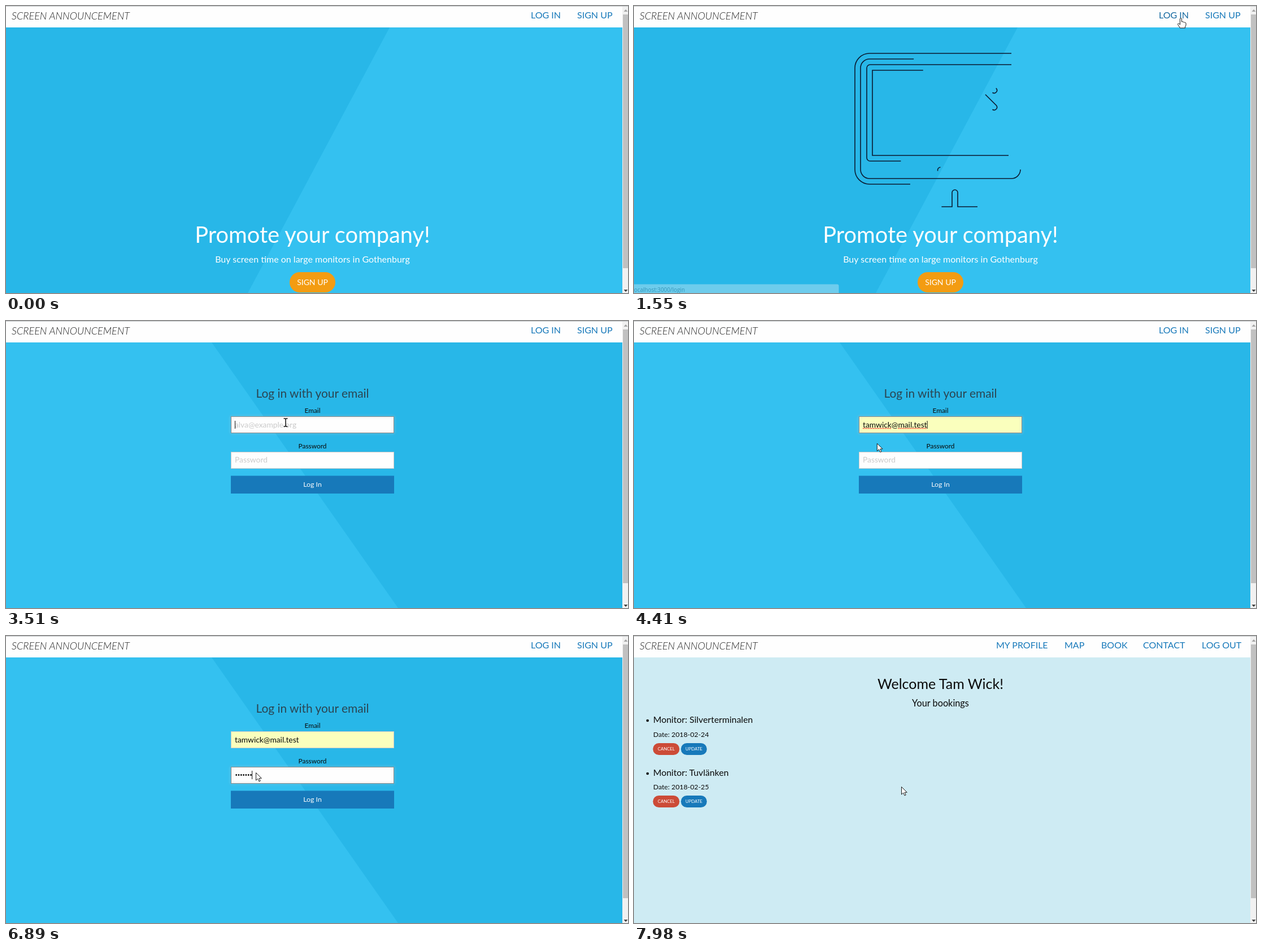
Animation of 1101 by 509 pixels, one loop 8 s. Source, as an HTML page:

```html
<!DOCTYPE html>
<html lang="en">
<head>
<meta charset="utf-8">
<title>Screen booking</title>
<style>
  html, body { margin: 0; width: 100%; height: 100%; overflow: hidden; background: #fefefe; }
  svg { display: block; width: 100%; height: 100%; }
  text { font-family: Lato, sans-serif; white-space: pre; }
  .mid { text-anchor: middle; }
  .nav { font-size: 16px; fill: #1779ba; }
  .dark { fill: #0a0a0a; }
  .white { fill: #fefefe; }
  .input { font-size: 13.8px; }
  .hint { fill: #cacaca; }
  .field { fill: #fefefe; stroke: #cacaca; }
  .glow { fill: none; stroke: #8a8a8a; filter: drop-shadow(0 0 2.5px #cacaca); }
  .caret { stroke: #111; }
  .squiggle { stroke: #e33; stroke-width: 1.4; stroke-dasharray: 2 1; }
  .pointer { fill: #fff; stroke: #1b1b1b; stroke-linejoin: round; }
  #monitor path { fill: none; stroke: #0b1a30; stroke-width: 1.6; }
</style>
</head>
<body>
<svg viewBox="0 0 1101 509">
  <defs>
    <g id="buttons">
      <rect x="33.5" y="190" width="47" height="21" rx="10.5" fill="#cc4b37"/>
      <rect x="83" y="190" width="46" height="21" rx="10.5" fill="#1779ba"/>
      <g class="mid white" font-size="7.8">
        <text x="57" y="202.5">CANCEL</text>
        <text x="106" y="202.5">UPDATE</text>
      </g>
    </g>
  </defs>

  <g id="home">
    <path fill="#28b7e8" d="M0 38H1091V509H0z"/>
    <path fill="#34c1f0" d="M679 38H1091V509H428z"/>
    <g id="monitor">
      <path d="M668 84H417a26 26 0 0 0-26 26V290a26 26 0 0 0 26 26H668a26 26 0 0 0 26-26V110a26 26 0 0 0-26-26z
               M684 290a16 16 0 0 1-16 16H417a16 16 0 0 1-16-16V110a16 16 0 0 1 16-16H668a16 16 0 0 1 16 16z"/>
      <path d="M668 104H418a6 6 0 0 0-6 6V269a6 6 0 0 0 6 6H668a6 6 0 0 0 6-6V110a6 6 0 0 0-6-6z
               M663 265H422V114H663z"/>
      <path d="M608 356H573V331a5 5 0 0 0-10 0V356H522V331a5 5 0 0 0-10 0V356H477a5 5 0 0 0 0 10H608a5 5 0 0 0 0-10z"/>
      <path d="M542.5 286a5 5 0 0 0 0 10a5 5 0 0 0 0-10z"/>
      <path d="M634.5 183.5a5 5 0 0 0 7-7l-40-40a5 5 0 0 0-7 7z"/>
      <path d="M634.5 153.5a5 5 0 0 0 7-7l-8-8a5 5 0 0 0-7 7z"/>
    </g>
    <rect x="502" y="472" width="81" height="36" rx="18" fill="#f39c12"/>
    <g class="mid white">
      <text x="542.5" y="420" font-size="39.8">Promote your company!</text>
      <text x="542.5" y="455" font-size="16">Buy screen time on large monitors in Gothenburg</text>
      <text x="542.5" y="495" font-size="14">SIGN UP</text>
    </g>
  </g>

  <g id="login">
    <path fill="#28b7e8" d="M0 38H1091V509H0z"/>
    <path fill="#34c1f0" d="M0 38H364L694 509H0z"/>
    <g class="mid dark">
      <text x="542.5" y="136" font-size="20.9" fill="#2b4552">Log in with your email</text>
      <text x="542.5" y="163" font-size="11.9">Email</text>
      <text x="542.5" y="226" font-size="11.9">Password</text>
    </g>
    <rect id="emailField" class="field" x="398.5" y="169.5" width="288" height="29"/>
    <rect class="field" x="398.5" y="232.5" width="288" height="29"/>
    <rect id="emailGlow" class="glow" x="398.5" y="169.5" width="288" height="29"/>
    <rect id="passGlow" class="glow" x="398.5" y="232.5" width="288" height="29"/>
    <text id="emailHint" class="input hint" x="405" y="189">alva@example.org</text>
    <text id="email" class="input dark" x="405" y="189">tamwick@mail.test</text>
    <g id="squiggles" class="squiggle">
      <line id="userLine" y1="190.5" y2="190.5"/>
      <line id="hostLine" y1="190.5" y2="190.5"/>
    </g>
    <text id="passHint" class="input hint" x="405" y="251">Password</text>
    <line id="dots" x1="407.7" y1="246.5" y2="246.5" stroke="#0a0a0a" stroke-width="2.9"
          stroke-linecap="round" stroke-dasharray="0 4.3"/>
    <path id="emailCaret" class="caret" d="M0 177v14"/>
    <path id="passCaret" class="caret" d="M0 239v15"/>
    <rect x="398" y="274.5" width="289" height="31.5" fill="#1779ba"/>
    <text class="mid white" x="542.5" y="294" font-size="12.3">Log In</text>
  </g>

  <g id="bookings">
    <path fill="#ceebf3" d="M0 38H1091V509H0z"/>
    <g class="dark">
      <text class="mid" x="542.5" y="94" font-size="25">Welcome Tam Wick!</text>
      <text class="mid" x="542.5" y="125" font-size="16.3">Your bookings</text>
      <circle cx="24" cy="150" r="2.3"/>
      <text x="34" y="154" font-size="15.8">Monitor: Silverterminalen</text>
      <text x="34" y="179" font-size="12.3">Date: 2018-02-24</text>
      <circle cx="24" cy="244" r="2.3"/>
      <text x="34" y="248" font-size="15.8">Monitor: Tuvlänken</text>
      <text x="34" y="272" font-size="12.3">Date: 2018-02-25</text>
    </g>
    <use href="#buttons"/>
    <use href="#buttons" y="93"/>
  </g>

  <path fill="#fefefe" d="M0 0H1091V37.5H0z"/>
  <path fill="#c4c6c8" d="M0 0H1101V1H0z"/>
  <text x="10" y="24" font-size="18" font-style="italic" font-weight="300" fill="#222">SCREEN ANNOUNCEMENT</text>
  <g id="guestNav" class="nav">
    <text id="loginLink" x="929" y="22">LOG IN</text>
    <text x="1011" y="22">SIGN UP</text>
  </g>
  <g id="userNav" class="nav">
    <text x="641" y="22">MY PROFILE</text>
    <text x="762" y="22">MAP</text>
    <text x="827" y="22">BOOK</text>
    <text x="901" y="22">CONTACT</text>
    <text x="1005" y="22">LOG OUT</text>
  </g>

  <path fill="#f1f1f1" d="M1091 1H1101V509H1091z"/>
  <path fill="#c1c1c1" d="M1092 15H1101V465H1092z"/>
  <path fill="#a3a3a3" d="M1093.5 10l3.5-4 3.5 4z"/>
  <path fill="#404040" d="M1093.5 503l3.5 4 3.5-4z"/>

  <g id="status">
    <path fill="#f2f4f5" d="M0 493.5H359.500q3 0 3 3V509H0z"/>
    <text x="0" y="507" fill="#4a5a62" style="font:9.9px 'Open Sans',sans-serif">ocalhost:3000/login</text>
  </g>

  <g id="cursor">
    <path id="arrow" class="pointer" d="M.5.5V14L3.700 11 6 16 8.200 15 6 10.300H10.300z"/>
    <path id="hand" class="pointer" d="M-1.500 1.500q1.500-2 3 0V7q2-1 2.700.6 2-.7 2.500.8 2-.5 2.300 1.300V13l-1.500 3v2H-1.500L-5.500 11.500q0-2 2-1.300L-1.500 12z"/>
    <path id="beam" d="M-3.500-7h2.500l1 1 1-1h2.500M0-6V6M-3.500 7h2.500l1-1 1 1h2.500" fill="none" stroke="#111" stroke-width="1.5"/>
  </g>
</svg>
<script>
const LOOP = 8000, DOT = 4.3;
const LOGIN_AT = 2630, BOOKINGS_AT = 7440;
const EMAIL_FOCUS = 3510, PREVIEW_AT = 3960, FILL_AT = 4410, PASS_FOCUS = 4800;
const keyTimes = [5660, 5660, 6050, 6130, 6360, 6530, 6660];

// Pointer track: time, x, y
const track = [
  [80, 320, 2], [860, 810, 42], [1470, 968, 21], [1740, 968, 21],
  [2630, 651, 95], [3160, 495, 180], [3580, 495, 180], [4110, 427, 211],
  [4360, 427, 211], [4650, 443, 243], [6889, 443, 243], [6890, 442, 242],
  [7599, 442, 242], [7600, 449, 248], [7979, 449, 248], [7980, 473, 267], [LOOP, 473, 267]
];

const $ = id => document.getElementById(id);
const show = (id, on) => { $(id).style.display = on ? '' : 'none'; };
const within = (t, from, to) => t >= from && t < to;
const ramp = (t, from, to) => Math.min(1, Math.max(0, (t - from) / (to - from)));
const smooth = x => x * x * (3 - 2 * x);

const strokes = [...document.querySelectorAll('#monitor path')].map(path => {
  const length = path.getTotalLength();
  path.style.strokeDasharray = length;
  return { path, length };
});

function pointerAt(t) {
  const i = Math.max(1, track.findIndex(key => key[0] > t));
  const [t0, x0, y0] = track[i - 1], [t1, x1, y1] = track[i];
  const k = ramp(t, t0, t1);
  return [x0 + (x1 - x0) * k, y0 + (y1 - y0) * k];
}

function drawHome(t) {
  const progress = smooth(ramp(t, 80, 4180));
  for (const { path, length } of strokes) path.style.strokeDashoffset = length * (1 - progress);
  show('monitor', progress > 0);
}

function drawLogin(t) {
  const toPass = ramp(t, PASS_FOCUS - 50, PASS_FOCUS + 160);
  $('emailGlow').style.opacity = t >= EMAIL_FOCUS ? 1 - toPass : 0;
  $('passGlow').style.opacity = toPass;

  const filled = t >= PREVIEW_AT;
  $('emailField').style.fill = filled ? '#faffbd' : '';
  show('emailHint', !filled);
  show('email', filled);
  show('squiggles', within(t, FILL_AT, PASS_FOCUS));
  show('emailCaret', within(t, EMAIL_FOCUS, 3730) || within(t, FILL_AT, PASS_FOCUS));

  const email = $('email');
  const textX = n => 405 + (n && email.getSubStringLength(0, n));
  if (filled) {
    const size = email.textContent.length, at = email.textContent.indexOf('@');
    const underline = (id, from, to) => {
      $(id).setAttribute('x1', textX(from));
      $(id).setAttribute('x2', textX(to));
    };
    underline('userLine', 0, at);
    underline('hostLine', at + 1, size);
    $('emailCaret').setAttribute('transform', `translate(${textX(size) + .5})`);
  } else {
    $('emailCaret').setAttribute('transform', 'translate(405.5)');
  }

  const typed = keyTimes.filter(time => t >= time).length;
  show('passHint', !typed);
  show('dots', typed);
  $('dots').setAttribute('x2', 407.8 + DOT * Math.max(0, typed - 1));
  show('passCaret', t >= PASS_FOCUS && !within(t, 5360, 5660));
  $('passCaret').setAttribute('transform', `translate(${405.5 + DOT * typed})`);
}

function drawPointer(t) {
  const [x, y] = pointerAt(t);
  const hand = within(t, 1400, 1860);
  const beam = within(t, 3090, 3730) || within(t, 4580, 6890);
  $('cursor').setAttribute('transform', `translate(${x} ${y})`);
  show('cursor', t >= 80);
  show('hand', hand);
  show('beam', beam);
  show('arrow', !hand && !beam);
}

function draw(t) {
  const home = t < LOGIN_AT, bookings = t >= BOOKINGS_AT;
  show('home', home);
  show('login', !home && !bookings);
  show('bookings', bookings);
  show('guestNav', !bookings);
  show('userNav', bookings);
  $('loginLink').style.fill = within(t, 1400, LOGIN_AT) ? '#1468a0' : '';
  $('status').style.opacity = .6 * (ramp(t, 1430, 1640) - ramp(t, 2700, 2860));
  if (home) drawHome(t);
  else if (!bookings) drawLogin(t);
  drawPointer(t);
}

const start = performance.now();
function frame() {
  draw((performance.now() - start) % LOOP);
  requestAnimationFrame(frame);
}
frame();
</script>
</body>
</html>
```
